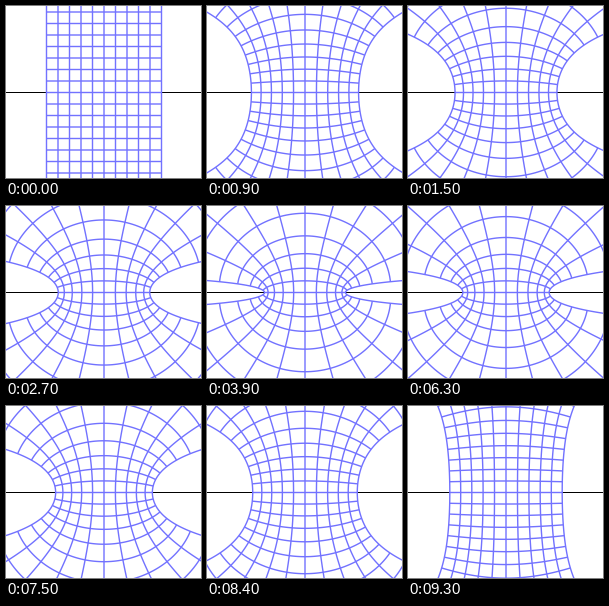
Animation, 195 px wide and 172 px high, one loop 9.6 s. Source, as a matplotlib script:

```python
import numpy as np
import matplotlib.pyplot as plt
from matplotlib.animation import FuncAnimation
from matplotlib.collections import LineCollection

W, H, DPI = 195, 172, 100
FRAMES, STEP_MS = 32, 300
CX, CY = 98, 86.5
HALF = 57.5                      # half width of the strip in pixels
SCALE = HALF / (np.pi / 2)
BLUE = "#7272ff"
PX = 72 / DPI

# Grid on the strip |Re z| <= pi/2, ten cells across
cell = np.pi / 10
cols = np.arange(-5, 6) * cell
rows = np.arange(-10, 11) * cell
down = np.linspace(rows[0], rows[-1], 241)
across = np.linspace(cols[0], cols[-1], 81)
grid = [x + 1j * down for x in cols] + [across + 1j * y for y in rows]


def to_pixels(w):
    return np.column_stack([CX + SCALE * w.real, CY - SCALE * w.imag])


def morph(z, s):
    """Straight-line homotopy from the identity to sin."""
    return (1 - s) * z + s * np.sin(z)


fig = plt.figure(figsize=(W / DPI, H / DPI), dpi=DPI, facecolor="white")
ax = fig.add_axes([0, 0, 1, 1])
ax.set_xlim(0, W)
ax.set_ylim(H, 0)
ax.axis("off")

ax.plot([0, W], [CY, CY], color="black", lw=PX, snap=False, zorder=1)
mesh = LineCollection([], colors=BLUE, linewidths=1.4 * PX, zorder=2)
mesh.set_snap(False)
ax.add_collection(mesh, autolim=False)


def update(i):
    half = FRAMES // 2
    s = 1 - abs(i - half) / half
    mesh.set_segments([to_pixels(morph(z, s)) for z in grid])
    return (mesh,)


anim = FuncAnimation(fig, update, frames=FRAMES, interval=STEP_MS,
                     repeat=True, repeat_delay=0)
plt.show()
```
